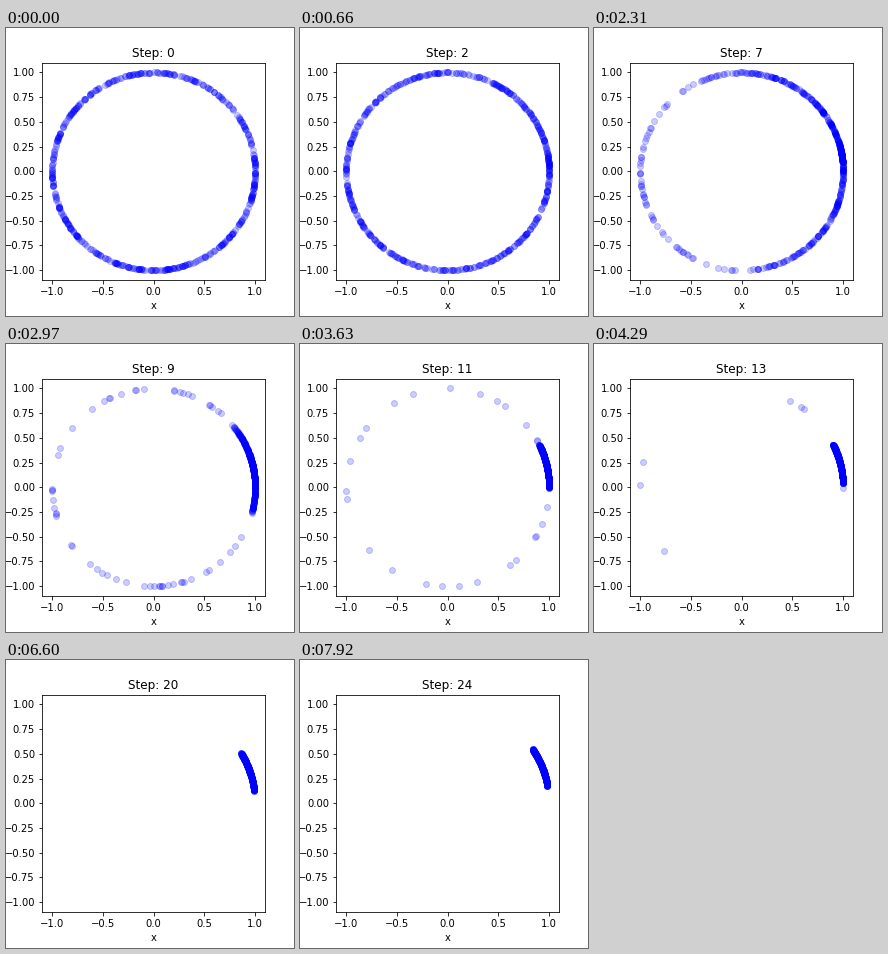
Recreate the animation shown at these times as a matplotlib script. Size 288x288 px, loop 8000 ms.

```python
import numpy as np
import matplotlib.pyplot as plt
from matplotlib.animation import FuncAnimation

LOOP_MS, STEP_MS, TICK_MS = 8000, 330, 20
COUNT = 500
HALF_ARC = 11.6   # half width of the final cluster, degrees
TAIL = 180        # extra reach of the early, loose cluster, degrees

# Place of each particle inside the cluster, from edge to edge
place = np.random.default_rng(7).uniform(-1, 1, COUNT)


def fade(step, middle, rate):
    """Logistic fall from 1 to 0."""
    return 1 / (1 + np.exp(rate * (step - middle)))


def positions(step):
    # Free particles jump anywhere; the others gather on a slowly turning arc
    n_free = round(COUNT * fade(step, 5.6, 0.54))
    free = np.random.default_rng(100 + step).uniform(0, 360, n_free)
    u = place[n_free:]
    center = 4.8 + 0.7 * step
    joined = center + HALF_ARC * u + TAIL * fade(step, 7, 1.2) * u**3
    angle = np.radians(np.concatenate([free, joined]))
    return np.column_stack([np.cos(angle), np.sin(angle)])


fig, ax = plt.subplots(figsize=(4, 4), dpi=72)
fig.subplots_adjust(left=0.125, right=0.9, bottom=0.125, top=0.88)
ax.set(xlim=(-1.1, 1.1), ylim=(-1.1, 1.1), xlabel="x")
ax.set_xticks(np.arange(-1, 1.01, 0.5))
ax.set_yticks(np.arange(-1, 1.01, 0.25))
title = ax.set_title("Step: 0")
dots = ax.scatter(*positions(0).T, color="blue", alpha=0.2)


def update(frame):
    step = (frame * TICK_MS + TICK_MS // 2) // STEP_MS
    dots.set_offsets(positions(step))
    title.set_text(f"Step: {step}")
    return dots, title


anim = FuncAnimation(fig, update, frames=LOOP_MS // TICK_MS, interval=TICK_MS,
                     repeat=True, repeat_delay=0)
plt.show()
```
